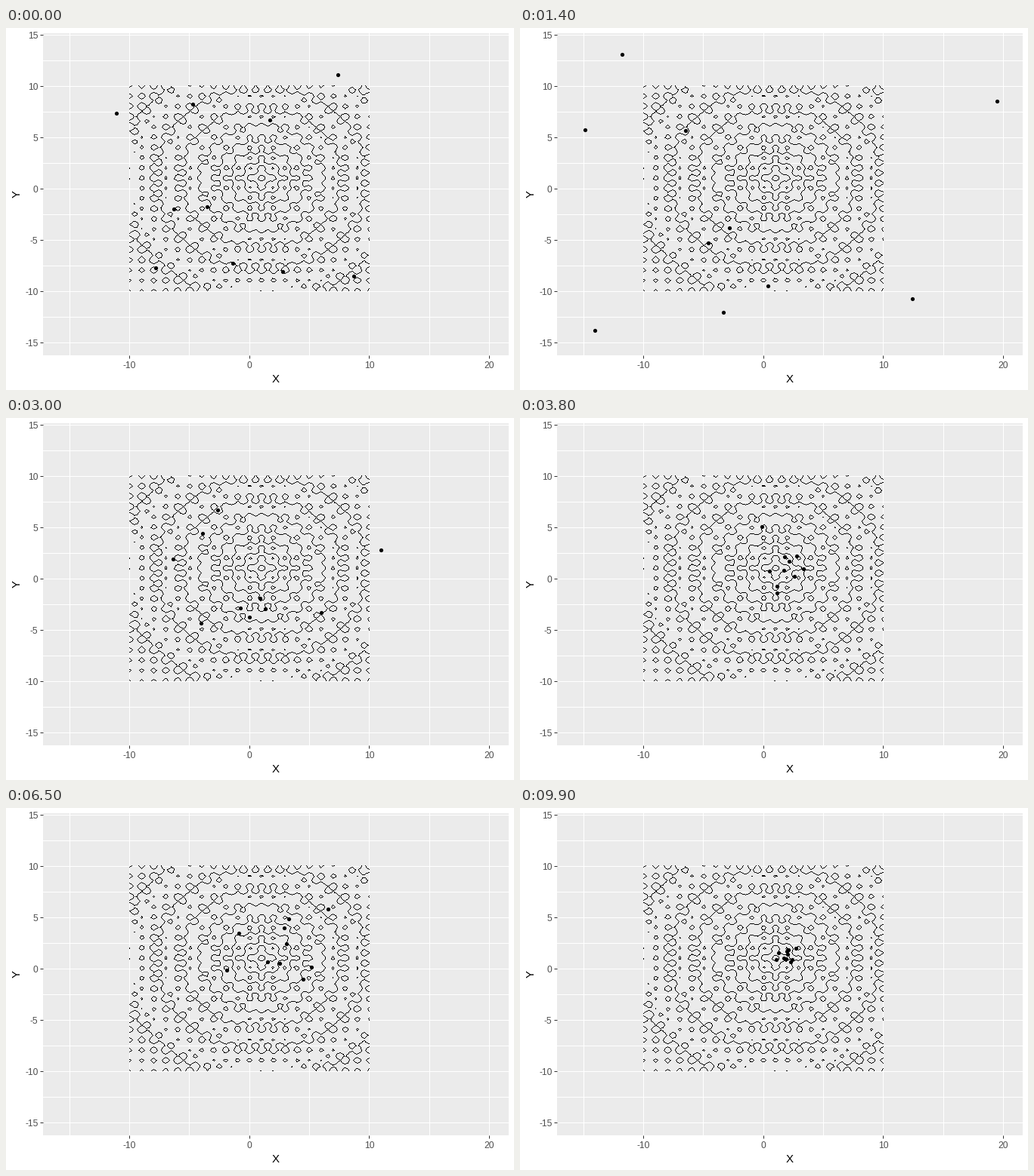
Write a matplotlib script that moves like this. It is 672x480 px and loops after 10 s.

```python
import numpy as np
import matplotlib.pyplot as plt
from matplotlib.animation import FuncAnimation

plt.rcParams["font.family"] = "Liberation Sans"
plt.rcParams["axes.unicode_minus"] = False

W, H, DPI = 672, 480, 96
PX = 72 / DPI                      # one pixel in points
FRAMES, STEPS = 100, 11            # frames per loop, frames per iteration
LEFT, RIGHT, TOP, BOTTOM = 49, 665, 7, 434

BEST = np.array([350, 198])        # where the swarm gathers, in stage pixels
GLIDE = (0.47, 0.92, 1)            # flight through the centre to the far side
DECAY = 0.59                       # distance to BEST kept per iteration

# Key points of each particle: start, outermost, turning back, far side.
PATHS = np.array([
    [(146, 113), (77, 121), (110, 171), (436, 219)],
    [(247, 101), (107, 27), (208, 58), (418, 245)],
    [(349, 122), (226, 126), (199, 162), (378, 136)],
    [(439, 62), (636, 78), (619, 149), (258, 225)],
    [(460, 329), (531, 375), (486, 315), (283, 147)],
    [(198, 318), (81, 415), (147, 364), (471, 96)],
    [(300, 312), (262, 391), (287, 341), (389, 117)],
    [(366, 323), (330, 359), (322, 296), (383, 169)],
    [(222, 240), (218, 296), (333, 255), (343, 207)],
    [(266, 237), (276, 261), (279, 274), (369, 211)],
])


def to_x(px):
    return (np.asarray(px) - 321.7) / 15.87


def to_y(px):
    return (213 - np.asarray(px)) / 13.6


def mix(a, b, t):
    return a + (b - a) * t


def ackley(x, y):
    """Ackley function with its minimum moved to (1, 1)."""
    r = np.sqrt(0.5 * ((x - 1) ** 2 + (y - 1) ** 2))
    waves = 0.5 * (np.cos(2 * np.pi * x) + np.cos(2 * np.pi * y))
    return 20 + np.e - 20 * np.exp(-0.2 * r) - np.exp(waves)


def iterations():
    """Positions of all particles after each iteration."""
    start, out, turn, far = PATHS.transpose(1, 0, 2)
    glide = [mix(turn, far, t) for t in GLIDE]
    settle = [mix(BEST, far, DECAY ** n) for n in range(1, 5)]
    return np.array([start, out, turn, *glide, *settle])


def pixel_line(points):
    """Whole pixels along a polyline, one per step of the longer axis."""
    points = np.floor(points + 0.5)
    runs = [np.empty((0, 2))]
    for a, b in zip(points[:-1], points[1:]):
        n = int(np.abs(b - a).max())
        if n:
            runs.append(np.floor(np.linspace(a, b, n + 1) + 0.5))
    return np.concatenate(runs)


def draw_contours(ax):
    side = np.linspace(-10, 10, 100)
    gx, gy = np.meshgrid(side, side)
    lines = ax.contour(gx, gy, ackley(gx, gy), levels=np.arange(2, 20, 2))
    segments = [s for level in lines.allsegs for s in level if len(s)]
    lines.remove()
    pixels = np.concatenate(
        [pixel_line(ax.transData.transform(s)) for s in segments])
    pixels = np.unique(pixels, axis=0)
    ax.plot(*pixels.T, ",", color="black", transform=None, zorder=2.5)


fig = plt.figure(figsize=(W / DPI, H / DPI), dpi=DPI, facecolor="white")
ax = fig.add_axes([LEFT / W, 1 - BOTTOM / H,
                   (RIGHT - LEFT) / W, (BOTTOM - TOP) / H],
                  facecolor="#EBEBEB")
ax.set_xlim(to_x(LEFT), to_x(RIGHT))
ax.set_ylim(to_y(BOTTOM), to_y(TOP))
ax.set_autoscale_on(False)
for spine in ax.spines.values():
    spine.set_visible(False)

ax.set_axisbelow(True)
ax.set_xticks([-10, 0, 10, 20])
ax.set_yticks(range(-15, 16, 5))
ax.set_xticks([-15, -5, 5, 15], minor=True)
ax.set_yticks(np.arange(-12.5, 13, 5), minor=True)
ax.grid(which="both", color="white", linewidth=PX, linestyle="-")
ax.tick_params(which="major", length=3.67 * PX, width=PX, pad=2.9 * PX,
               color="#333333", labelcolor="#4D4D4D", labelsize=9)
ax.tick_params(axis="x", which="major", pad=4 * PX)
ax.tick_params(which="minor", length=0)

fig.text(356.5 / W, 1 - 466.5 / H, "X", size=11.25, ha="center", va="center")
fig.text(14.5 / W, 1 - 220 / H, "Y", size=11.25, ha="center", va="center",
         rotation=90)

draw_contours(ax)
dots, = ax.plot([], [], "o", color="black", markersize=5.2 * PX,
                markeredgewidth=0, zorder=3)
swarm = iterations()


def draw(frame):
    k, step = divmod(frame, STEPS)
    pos = mix(swarm[k], swarm[min(k + 1, len(swarm) - 1)], step / STEPS)
    dots.set_data(to_x(pos[:, 0]), to_y(pos[:, 1]))
    return dots,


anim = FuncAnimation(fig, draw, frames=FRAMES, interval=100,
                     repeat=True, repeat_delay=0)
plt.show()
```
